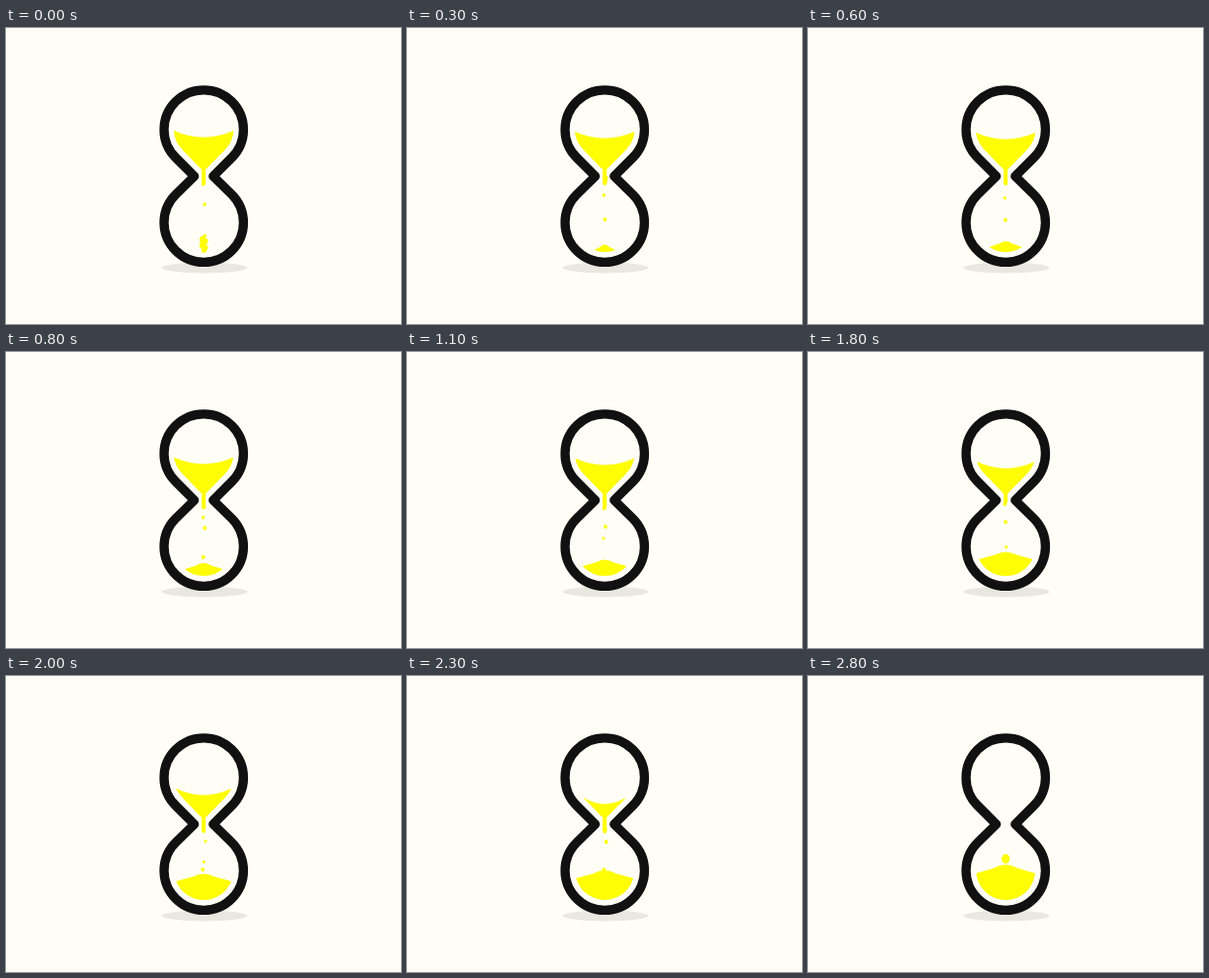
Animation of 400x300 px, one loop 2900 ms. Source, as an HTML page:

```html
<!DOCTYPE html>
<html lang="en">
<head>
<meta charset="utf-8">
<title>Hourglass</title>
<style>
  html, body { margin: 0; width: 100%; height: 100%; overflow: hidden; background: #fefef7; }
  svg { display: block; width: 400px; height: 300px; }
  .glass { fill: none; stroke: #111; stroke-width: 9.3; stroke-linejoin: round; }
  .sand { fill: #fffd04; }
</style>
</head>
<body>
<svg viewBox="0 0 400 300">
  <ellipse cx="201" cy="243" rx="43.5" ry="5.4" fill="#e9e8e0"/>
  <g class="sand">
    <path id="top"/>
    <path id="pile"/>
    <g id="drops"></g>
  </g>
  <path class="glass" d="M190.7 150.3 L171.8 131.4 A40.2 40.2 0 1 1 228.7 131.4 L209.8 150.3 L228.7 168.8 A40.2 40.2 0 1 1 171.8 168.8 Z"/>
</svg>
<script>
const LOOP = 2900, STEP = 100, LAST = 2580;
const NECK = 152, FALL = 280, DEPTH = 54;
const CX = 200.2;
const $ = id => document.getElementById(id);

let seed = 7;
const rand = () => (seed = seed * 16807 % 2147483647) / 2147483647;
const jitter = n => (rand() * 2 - 1) * n;

// half width of a round bulb at height y
const chord = (r, cy, y) => Math.sqrt(Math.max(0, r * r - (y - cy) ** 2));

function makeGrains() {
  const list = [];
  // a clump reaches the floor first, then a steady trickle, then one last drop
  for (let i = 0; i < 6; i++) list.push({ born: -300 - i * 5, x: CX + jitter(1.5 + i * .5), r: 2.7 });
  for (let ms = -280; ms < 2450; ms += 80)
    list.push({ born: ms + jitter(35), x: CX + .3 + jitter(1.6), r: 1.6 + jitter(.3) });
  list.push({ born: LAST, x: CX, r: 4.2 });
  return list;
}

function upperSand(t) {
  if (t > LAST) return '';
  const s = t / 1000;
  const edge = 104 + 3.4 * s + 40 * (s / 2.65) ** 9;
  const mid = Math.min(144, edge + 6.7);
  const round = edge < 123.5;
  const w = round ? chord(30.4, 102, edge) : Math.max(2, 145 - edge);
  // the trickle thins for a moment halfway
  const end = 157.5 - 8.5 * Math.exp(-(((s - 1.6) / .28) ** 4));
  const right = round ? `A30.4 30.4 0 0 1 ${CX + 21.5} 123.5` : '';
  const left = round ? `L${CX - 21.5} 123.5 A30.4 30.4 0 0 1 ${CX - w} ${edge}` : '';
  return `M${CX - w} ${edge} Q${CX} ${2 * mid - edge} ${CX + w} ${edge} ${right}
    L${CX + 2} 143.5 V${end} a2 2 0 0 1 -4 0 V143.5 ${left} Z`;
}

function pile(t) {
  const s = t / 1000, edge = 228 - 10 * s;
  return { edge, peak: edge - 5 - 1.3 * s, w: chord(30, 197, edge) };
}

function lowerSand({ edge, peak, w }) {
  if (w < 1) return '';
  const h = peak + (edge - peak) * .4;
  return `M${CX - w} ${edge} L${CX - w * .4} ${h} Q${CX} ${2 * peak - h} ${CX + w * .4} ${h}
    L${CX + w} ${edge} A30 30 0 0 1 ${CX - w} ${edge} Z`;
}

const grains = makeGrains();
for (const g of grains) {
  g.el = document.createElementNS('http://www.w3.org/2000/svg', 'ellipse');
  g.el.setAttribute('cx', g.x);
  g.el.setAttribute('rx', g.r);
  g.el.setAttribute('ry', g.r * 1.15);
  $('drops').appendChild(g.el);
}

function draw(t) {
  const heap = pile(t), floor = heap.w < 1 ? 226 : heap.peak;
  $('top').setAttribute('d', upperSand(t));
  $('pile').setAttribute('d', lowerSand(heap));
  for (const { el, born } of grains) {
    const age = (t - born) / FALL, y = NECK + DEPTH * age * age;
    el.setAttribute('cy', y);
    el.style.display = age > 0 && y < floor ? '' : 'none';
  }
}

const start = performance.now();
function tick() {
  const t = (performance.now() - start) % LOOP;
  draw(Math.floor(t / STEP) * STEP);
  requestAnimationFrame(tick);
}
tick();
</script>
</body>
</html>
```
